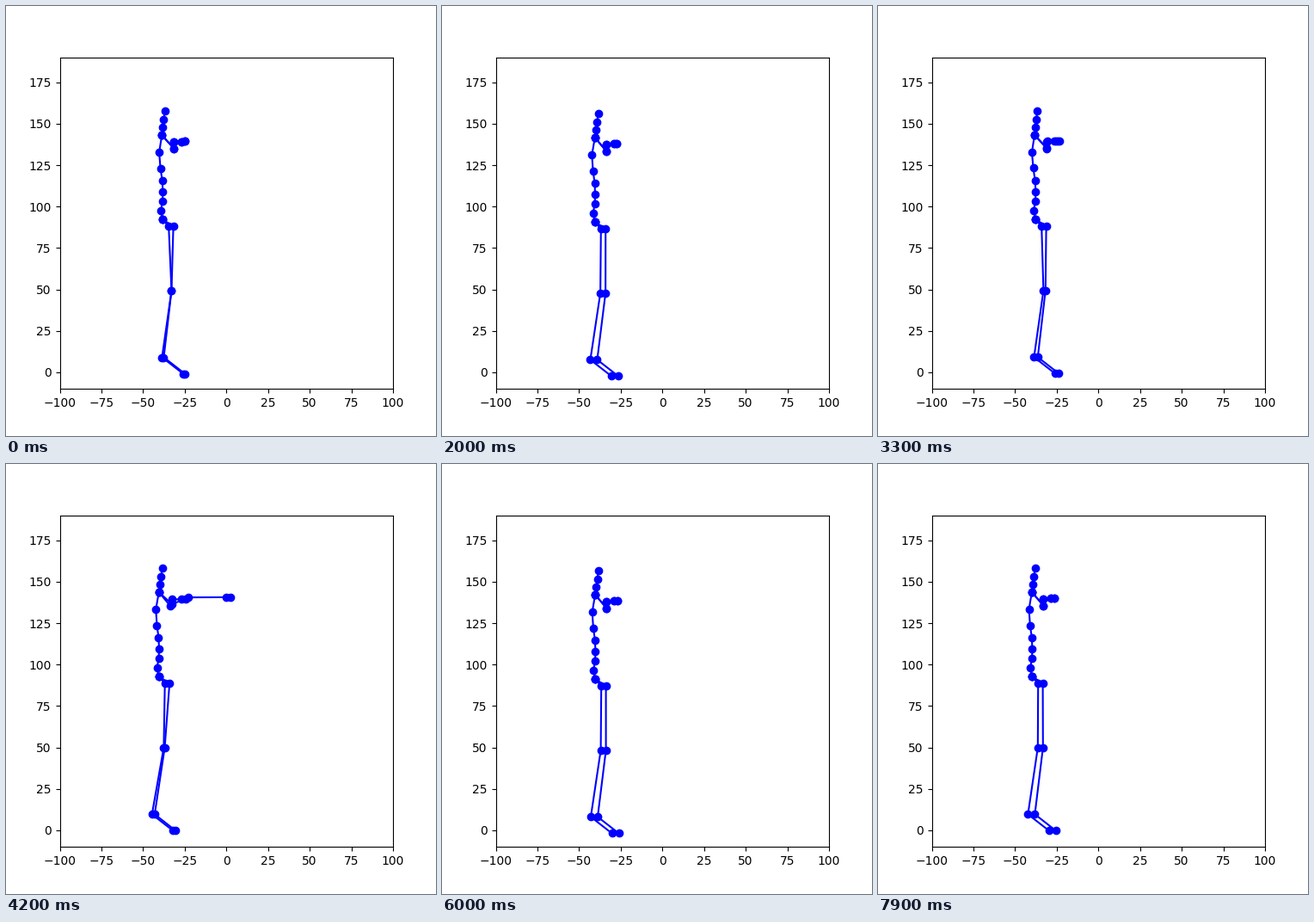
A matplotlib script that plays this animation: 500x500 px, repeating every 8 s.

```python
import numpy as np
import matplotlib.pyplot as plt
from matplotlib.animation import FuncAnimation

FRAMES, STEP = 80, 100

# turning points of each motion: (time in ms, value in pixels)
SWAY = [(0, 182), (1200, 168.5), (2700, 185), (4500, 177),
        (6000, 178), (7300, 177), (7900, 179)]
BOB = [(0, 248.2), (900, 256), (1100, 252), (2000, 251), (3300, 248),
       (4200, 247), (4450, 251.3), (6000, 250), (6900, 245.5),
       (7400, 251), (7900, 247)]
STANCE = [(0, 2), (2000, 8), (4000, 3), (6000, 8), (7900, 8)]

# centre, half width and length of each arm movement
REACHES = [(1000, 850, 72), (4050, 850, 63), (7000, 700, 78)]

# joints relative to the pelvis
SPINE = np.array([(2.3, -126), (1, -116), (0, -107), (-1, -98), (-4, -78),
                  (-2.5, -59.5), (-.3, -45), (.3, -32), (0, -21),
                  (-2, -10), (0, 0)])
ARM = np.array([(13.3, -82.5), (13.3, -90.5), (22, -90.7), (25.5, -91)])
NECK = 3
NEAR = np.array([.04, .36, .97, 1])
FAR = np.array([.01, .03, .08, .11])


def swing(keys, t):
    """Ease with a half cosine from one turning point to the next."""
    times, values = np.transpose(keys)
    i = min(np.searchsorted(times, t, side="right"), len(times) - 1)
    u = (t - times[i - 1]) / (times[i] - times[i - 1])
    return values[i - 1] + (values[i] - values[i - 1]) * (1 - np.cos(np.pi * u)) / 2


def reach(t):
    """Current arm movement: phase from 0 to 1, and its length."""
    for centre, width, length in REACHES:
        d = abs(t - centre) / width
        if d < 1:
            return np.cos(np.pi / 2 * d) ** 2, length
    return 0, 0


def to_data(points, origin):
    p = np.asarray(points) + origin
    return (p[:, 0] - 256.25) / 1.9375, (445 - p[:, 1]) / 1.925 - 10


def chains(t):
    x, y, stance = (swing(keys, t) for keys in (SWAY, BOB, STANCE))
    phase, length = reach(t)
    lean = (183 - x) / 14

    spine = SPINE.copy()
    spine[:, 0] += 5 * lean * (spine[:, 1] / 126) ** 2
    parts = [spine]

    foot = .8 - 5 * lean - 5.5 * phase
    for side in (-.5, .5):
        hip = 9.9 + 5.4 * side
        knee = 10.2 + .6 * foot + side * (stance - 2)
        ankle = foot + side * stance
        parts.append([(0, 0), (hip, 8), (knee, 82.8),
                      (ankle, 160.3), (ankle + 24.5, 179.4)])

    for share, lift in ((NEAR, 1.5), (FAR, -1)):
        arm = ARM.copy()
        arm[:, 0] += phase * length * share
        arm[:, 1] -= phase * lift
        parts.append(np.vstack([spine[NECK], arm]))
    return [to_data(p, (x, y)) for p in parts]


fig, ax = plt.subplots(figsize=(5, 5), dpi=100)
ax.set_xlim(-100, 100)
ax.set_ylim(-10, 190)
ax.set_xticks(range(-100, 101, 25))
ax.set_yticks(range(0, 176, 25))
lines = [ax.plot([], [], "bo-")[0] for _ in range(5)]


def update(frame):
    for line, (x, y) in zip(lines, chains(frame * STEP)):
        line.set_data(x, y)
    return lines


anim = FuncAnimation(fig, update, frames=FRAMES, interval=STEP, repeat=True,
                     repeat_delay=0)
plt.show()
```
